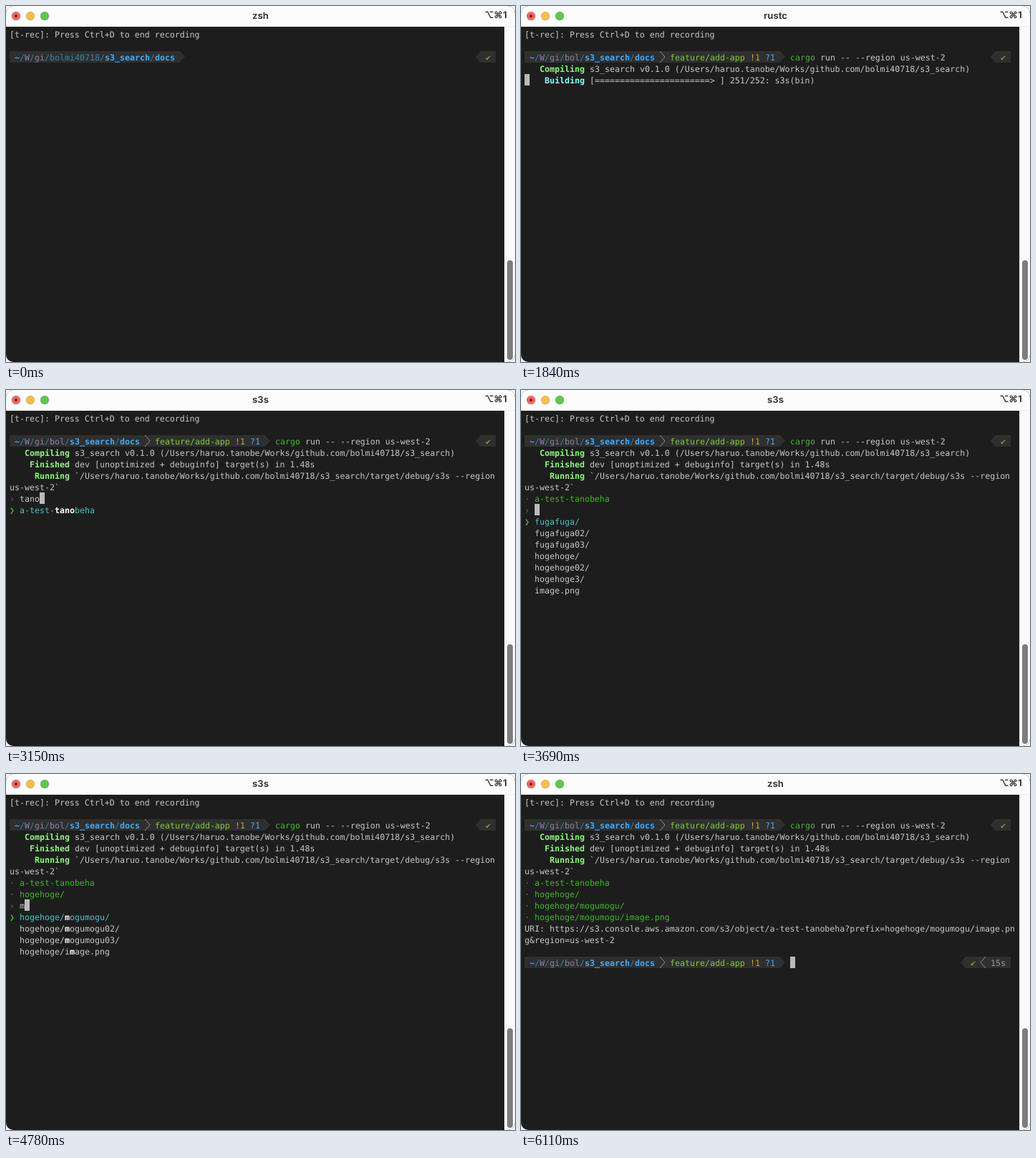
Recreate the animation shown at these times as an HTML page with a canvas. Size 711x497 px, loop 6.38 s.

```html
<!DOCTYPE html>
<html lang="en">
<head>
<meta charset="utf-8">
<title>Terminal session</title>
<style>
  html, body { margin: 0; width: 100%; height: 100%; overflow: hidden; background: #fff; }
  canvas { display: block; }
</style>
</head>
<body>
<canvas id="stage" width="711" height="497"></canvas>
<script>
const ctx = document.getElementById('stage').getContext('2d');
ctx.textRendering = 'geometricPrecision';
const LOOP = 6380;
const W = 711, H = 497;
const CELL = 7, LINE = 16, LEFT = 5, TOP = 31;
const MONO = '11.628px "DejaVu Sans Mono", "DejaVu Sans", monospace';
const UI = '"Inter", "DejaVu Sans", sans-serif';
const C = {
  bg: '#1d1d1d', bar: '#2f2f2f', text: '#c7c7c7', dim: '#686868', cursor: '#bbbbbb',
  dir: '#3384ad', short: '#8583ab', anchor: '#46a9f7', branch: '#80ca3d', dirty: '#d0a82c',
  green: '#43b530', red: '#fb6d66', lime: '#8ef77e', aqua: '#8ef9fd', cyan: '#50c3ca',
  white: '#ffffff', sep: '#8f8f8f', check: '#5fae2c'
};
const BUCKET = 'a-test-tanobeha';
const WORKS = '/Users/haruo.tanobe/Works/github.com/bolmi40718/s3_search';
const COMMAND = 'cargo run -- --region us-west-2';
const INPUT = 53;
const buckets = [BUCKET, 'concat-test'];
const folders = ['fugafuga/', 'fugafuga02/', 'fugafuga03/', 'hogehoge/', 'hogehoge02/', 'hogehoge3/', 'image.png'];
const nested = ['mogumogu/', 'mogumogu02/', 'mogumogu03/', 'image.png'].map(n => 'hogehoge/' + n);
const files = ['fugafuga.txt', 'image.png', 'image2.png'].map(n => 'hogehoge/mogumogu/' + n);

const colX = col => LEFT + col * CELL;
const rowY = row => TOP + row * LINE;

function rect(x, y, w, h, color) {
  ctx.fillStyle = color;
  ctx.fillRect(x, y, w, h);
}

function disc(x, y, r, color) {
  ctx.fillStyle = color;
  ctx.beginPath();
  ctx.arc(x, y, r, 0, Math.PI * 2);
  ctx.fill();
}

function light(x, color) {
  disc(x, 14, 6, color);
  ctx.strokeStyle = 'rgba(0,0,0,.12)';
  ctx.lineWidth = 1;
  ctx.stroke();
}

// Writes text on the character grid and returns the next free column.
function put(row, col, text, color = C.text, bold = false) {
  ctx.font = (bold ? 'bold ' : '') + MONO;
  ctx.textAlign = 'left';
  ctx.fillStyle = color;
  ctx.fillText(text, colX(col), rowY(row) + 13);
  return col + text.length;
}

function cursor(row, col) {
  rect(colX(col), rowY(row), CELL, LINE, C.cursor);
}

// A chevron one cell wide; dir 1 points right, -1 points left.
function chevron(row, col, dir, filled) {
  const y = rowY(row), back = colX(dir > 0 ? col : col + 1);
  ctx.beginPath();
  ctx.moveTo(back, y);
  ctx.lineTo(back + dir * CELL, y + LINE / 2);
  ctx.lineTo(back, y + LINE);
  if (filled) {
    ctx.fillStyle = C.bar;
    ctx.fill();
  } else {
    ctx.strokeStyle = C.sep;
    ctx.lineWidth = 1;
    ctx.stroke();
  }
}

function bar(row, from, to) {
  rect(colX(from), rowY(row), (to - from) * CELL, LINE, C.bar);
}

function path(row, user, userColor) {
  const parts = [['~', C.anchor, true], ['/', C.dir], ['W', C.short], ['/', C.dir], ['gi', C.short], ['/', C.dir],
    [user, userColor], ['/', C.dir], ['s3_search', C.anchor, true], ['/', C.dir], ['docs', C.anchor, true]];
  return parts.reduce((col, [text, color, bold]) => put(row, col, text, color, bold), 1);
}

function status(row, elapsed) {
  const start = elapsed ? 87 : 93;
  chevron(row, start, -1, true);
  bar(row, start + 1, 97);
  put(row, start + 2, '✔', C.check);
  if (elapsed) {
    chevron(row, 91, -1, false);
    put(row, 93, elapsed, '#989898');
  }
}

function shortPrompt(row) {
  bar(row, 0, 34);
  chevron(row, 34, 1, true);
  path(row, 'bolmi40718', C.dir);
  status(row);
}

function gitPrompt(row, elapsed) {
  bar(row, 0, 51);
  chevron(row, 51, 1, true);
  path(row, 'bol', C.short);
  chevron(row, 27, 1, false);
  put(row, 29, 'feature/add-app', C.branch);
  put(row, 45, '!1', C.dirty);
  put(row, 48, '?1', C.anchor);
  status(row, elapsed);
}

function commandLine(row, typed, active) {
  const valid = typed >= 5;
  const end = INPUT + typed;
  if (active) cursor(row, end);
  if (typed) {
    put(row, INPUT, COMMAND.slice(0, Math.min(typed, 5)), valid ? C.green : C.red, !valid);
    if (valid) put(row, INPUT + 5, COMMAND.slice(5, typed));
    if (typed < COMMAND.length) {
      put(row, end, COMMAND[typed], '#8f8f8f');
      put(row, end + 1, COMMAND.slice(typed + 1), C.dim);
    }
  }
}

function log(row, label, message, color = C.lime) {
  put(row, 12 - label.length, label, color, true);
  put(row, 13, message);
}

function chosen(row, text) {
  put(row, 0, '·', C.dim);
  put(row, 2, text, C.green);
}

function picker(row, items, selected = 0, query = '') {
  put(row, 0, '›', C.dim);
  put(row, 2, query);
  cursor(row, 2 + query.length);
  items.filter(item => item.includes(query)).forEach((item, i) => {
    const line = row + 1 + i;
    const color = i === selected ? C.cyan : C.text;
    const hit = item.indexOf(query), rest = hit + query.length;
    if (i === selected) put(line, 0, '❯', C.green);
    put(line, 2, item.slice(0, hit), color);
    put(line, 2 + hit, item.slice(hit, rest), C.white, true);
    put(line, 2 + rest, item.slice(rest), color);
  });
}

function label(text, x, baseline) {
  ctx.font = `700 13px ${UI}`;
  ctx.textAlign = 'center';
  ctx.fillStyle = '#3d3d3d';
  ctx.fillText(text, x, baseline);
}

function frameWindow(title) {
  rect(0, 0, W, H, '#ffffff');
  ctx.save();
  ctx.beginPath();
  ctx.roundRect(0, 0, W, H, 10);
  ctx.clip();
  rect(0, 0, W, H, C.bg);
  rect(0, 0, W, 28, '#fcfcfc');
  rect(0, 28, W, 1, '#ececec');
  rect(696, 29, 15, H - 29, '#fafafa');
  rect(696, 29, 1, H - 29, '#e2e2e2');
  ctx.restore();

  ctx.fillStyle = '#7d7d7d';
  ctx.beginPath();
  ctx.roundRect(700, 355, 8, 139, 4);
  ctx.fill();

  light(14, '#ec6a5e');
  disc(14, 14, 2, '#7d1a12');
  light(34, '#f4be4f');
  light(54, '#61c454');
  label(title, 355.5, 18);
  label('⌥', 675, 17);
  label('⌘', 687.5, 17);
  label('1', 697, 17);
}

// Value of the last [time, value] step already reached.
function stepAt(t, steps) {
  return steps.reduce((value, [start, next]) => t >= start ? next : value, undefined);
}

function draw(t) {
  frameWindow(stepAt(t, [[0, 'zsh'], [1580, 'cargo'], [1840, 'rustc'], [2360, 's3s'], [6110, 'zsh']]));
  put(0, 0, '[t-rec]: Press Ctrl+D to end recording');
  if (t < 250) return shortPrompt(2);

  gitPrompt(2);
  commandLine(2, stepAt(t, [[0, 0], [510, 1], [780, 3], [1040, 5], [1310, COMMAND.length]]), t < 1580);
  if (t < 1580) return;

  log(3, 'Compiling', `s3_search v0.1.0 (${WORKS})`);
  if (t < 2100) {
    cursor(4, 0);
    return log(4, 'Building', `[${'='.repeat(23)}> ] 251/252: s3s(bin)`, C.aqua);
  }

  log(4, 'Finished', 'dev [unoptimized + debuginfo] target(s) in 1.48s');
  log(5, 'Running', '`' + WORKS + '/target/debug/s3s --region');
  put(6, 0, 'us-west-2`');
  if (t < 2620) return cursor(7, 0);
  if (t < 3420) return picker(7, buckets, 0, stepAt(t, [[0, ''], [2890, 'tan'], [3150, 'tano']]));

  chosen(7, BUCKET);
  if (t < 3690) return cursor(8, 0);
  if (t < 4510) return picker(8, folders, stepAt(t, [[0, 0], [3960, 2], [4230, 3]]));

  chosen(8, 'hogehoge/');
  if (t < 5580) return picker(9, nested, 0, stepAt(t, [[0, ''], [4780, 'm'], [5050, 'mog'], [5310, 'mogu']]));

  chosen(9, nested[0]);
  if (t < 6110) return picker(10, files, t < 5850 ? 0 : 1);

  chosen(10, files[1]);
  put(11, 0, `URI: https://s3.console.aws.amazon.com/s3/object/${BUCKET}?prefix=hogehoge/mogumogu/image.pn`);
  put(12, 0, 'g&region=us-west-2');
  gitPrompt(14, '15s');
  cursor(14, INPUT);
}

const start = performance.now();
function tick() {
  draw((performance.now() - start) % LOOP);
  requestAnimationFrame(tick);
}
tick();
</script>
</body>
</html>
```
